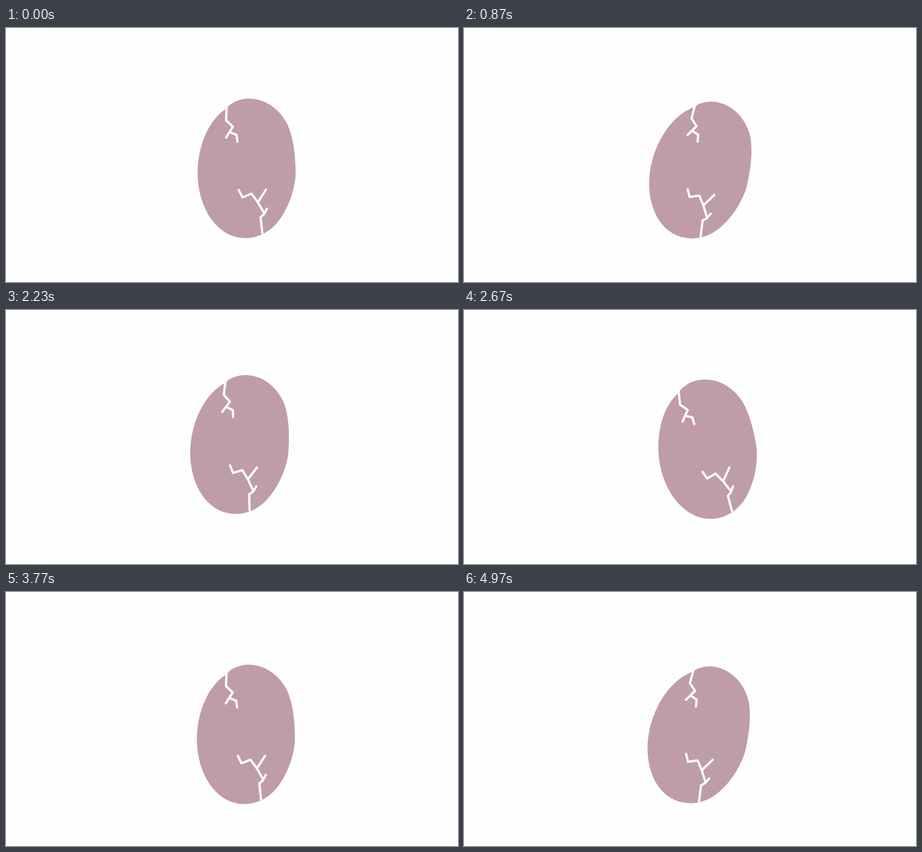
Animation, 998 px wide and 561 px high, one loop 5.01 s. Source, as an HTML page:

```html
<!DOCTYPE html>
<html lang="en">
<head>
<meta charset="utf-8">
<title>Wobbling egg</title>
<style>
  html, body { margin: 0; width: 100%; height: 100%; overflow: hidden; background: #fefefe; }
  svg { display: block; width: 100vw; height: 100vh; }
  .wing { fill: #fdfdfd; }
  .shell { fill: #bf9da6; }
  .crack { fill: none; stroke: #fdfcfb; stroke-width: 5; stroke-linecap: round; stroke-linejoin: round; }
</style>
</head>
<body>
<svg viewBox="0 0 998 561">
  <g id="egg">
    <path class="wing" d="M336 207Q346 205 354 213Q382 236 440 250V358Q412 346 395 333Q372 310 357 292Q364 288 374 291Q364 262 355 240Z"/>
    <path class="wing" d="M740 213Q728 211 718 217Q690 240 630 254V368Q668 354 690 325Q702 312 708 299Q702 296 694 298Q722 262 734 230Z"/>
    <path class="shell" d="M536 156C572 156 604 178 622 214C634 242 639.5 280 639.5 324C637 362 621 404 597 432C577 454 553 464 528 464C465 464 423 395 423 320C423 262 447 202 488 177C491 172 497 167 502 165C512 159 524 156 536 156Z"/>
    <path class="crack" d="M487 177L486 204L501 218L486 242M496 231L509 236L511 251"/>
    <path class="crack" d="M514 358L522 374L542 366L556 385L570 409M556 385L574 357"/>
    <path class="crack" d="M576 399L570 411L562 418L564 436L566 453"/>
  </g>
</svg>
<script>
  const LOOP = 5.01, FPS = 30, LAST = 149;
  const egg = document.getElementById("egg");

  const wave = (t, period) => Math.sin(2 * Math.PI * t / period);
  const bump = (t, at, width) => Math.exp(-(((t - at) / width) ** 2));

  // Swing of about two beats a second that hurries, then eases back
  function lean(t) {
    const beats = 1.972 * t + 0.29 + 0.3 * bump(t, 1.55, 0.61);
    return 3 + 12 * Math.cos(2 * Math.PI * beats);
  }

  // Slow drift with one hop up and to the left
  function drift(t) {
    const hop = bump(t, 2.2, 0.35);
    return [2 * wave(t, 6.5) - 12.5 * hop, 0.8 * t + 2.5 * wave(t, 3.46) - 13 * hop];
  }

  function draw(now) {
    // 5 ms keeps each step on its nearest centisecond
    const t = Math.min(LAST, Math.floor((now % LOOP + 0.005) * FPS)) / FPS;
    const angle = lean(t);
    const [x, y] = drift(t);
    egg.setAttribute("transform",
      `translate(${x - 0.82 * angle} ${y}) rotate(${angle} 531.5 310)`);
  }

  const start = performance.now();
  function tick() {
    draw((performance.now() - start) / 1000);
    requestAnimationFrame(tick);
  }
  tick();
</script>
</body>
</html>
```
